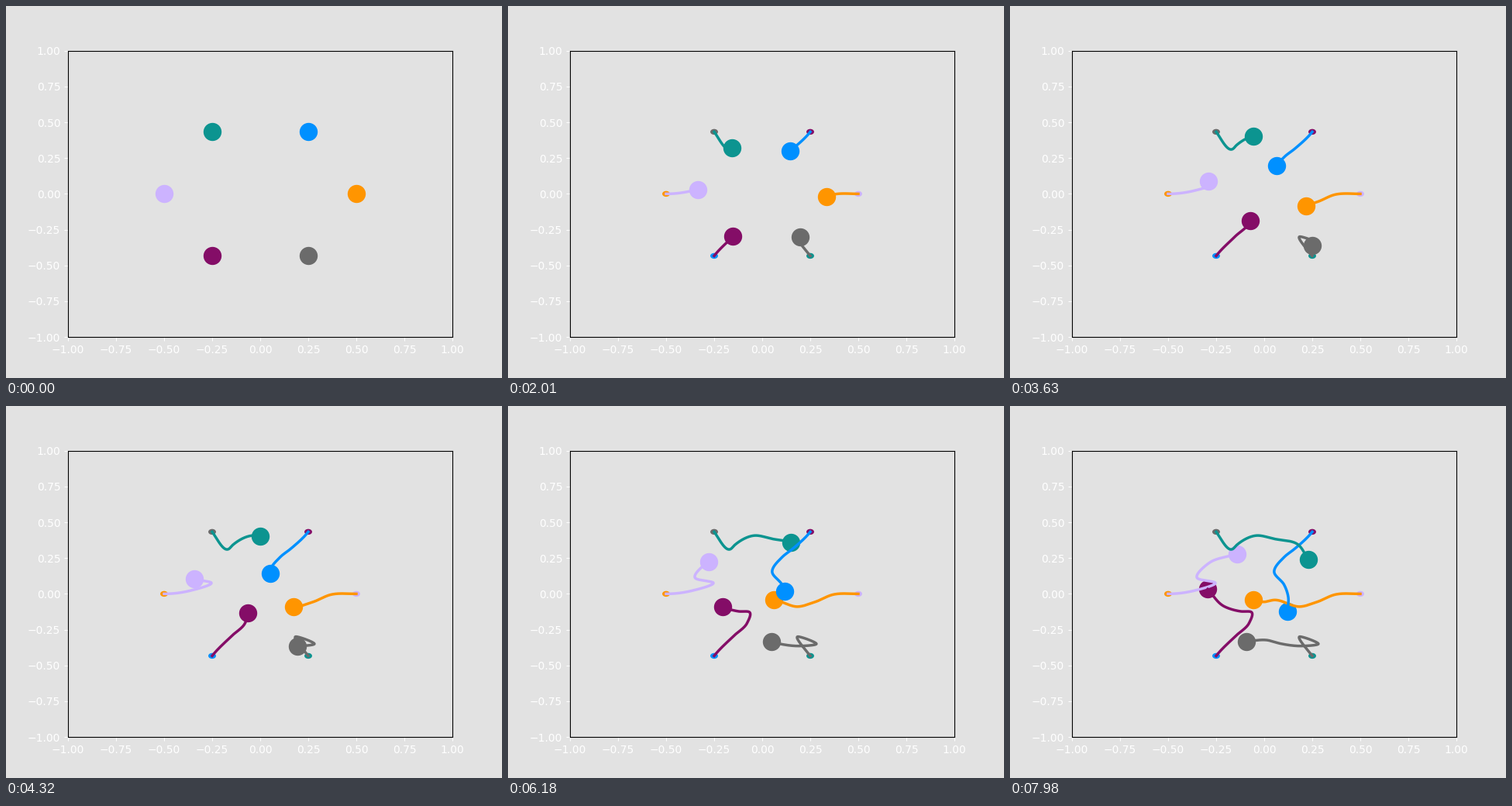
Animation of 640 by 480 pixels, one loop 8 s. Source, as a matplotlib script:

```python
import numpy as np
import matplotlib.pyplot as plt
from matplotlib.animation import FuncAnimation
from matplotlib.patches import Circle

W, H, DPI = 640, 480, 100
LOOP, INTERVAL, STEP = 8000, 20, 30
CRUISE = 1 / 12000      # axes units per ms
CRUISE_END = 3600
BG = "#e2e2e2"

# Agents counter-clockwise from the right: colour, and the turning points
# of its way in hundredths of an axes unit.
AGENTS = [
    ("#ff9500", [(36.9, -.5), (27.8, -5.5), (18.8, -8.9), (5, -4.3),
                 (-.2, -5.6), (-5.6, -4)]),
    ("#0090ff", [(15.9, 31.5), (10.5, 25.8), (5.2, 15.2), (10.3, 6.5),
                 (12.5, -2.1), (12.1, -12.4)]),
    ("#0c9490", [(-16.3, 31.4), (-14.3, 34.1), (-4.2, 40.7), (5.6, 38.3),
                 (16.7, 35.2), (23, 24.1)]),
    ("#ccb3ff", [(-36.5, 2.2), (-25.4, 7.7), (-34.9, 11.1), (-28.2, 22),
                 (-14.3, 27.7)]),
    ("#840d67", [(-15.1, -29.7), (-7.9, -20.5), (-6.7, -12.7),
                 (-12.3, -12.2), (-20.6, -8.9), (-29.4, 3.3)]),
    ("#6b6b6b", [(18.4, -29.9), (28.2, -35), (18.8, -36.4), (8.7, -34.8),
                 (1.4, -32.3), (-9.3, -33.2)]),
]


def lengths(pts):
    """Distance covered on reaching each point."""
    return np.r_[0, np.cumsum(np.hypot(*np.diff(pts, axis=0).T))]


def smooth_curve(pts, samples=60):
    """Hermite curve through the points, setting off towards the centre."""
    s = lengths(pts)
    slope = np.gradient(pts, s, axis=0)
    slope[0] = -pts[0] / np.hypot(*pts[0])
    u = np.linspace(0, 1, samples)[:, None]
    parts = []
    for k, h in enumerate(np.diff(s)):
        parts.append((1 + 2 * u) * (1 - u) ** 2 * pts[k]
                     + u * (1 - u) ** 2 * h * slope[k]
                     + u ** 2 * (3 - 2 * u) * pts[k + 1]
                     + u ** 2 * (u - 1) * h * slope[k + 1])
    return np.vstack(parts)


def travel(start, turns):
    """Positions per step: cruise first, then spread the rest evenly."""
    curve = smooth_curve(np.vstack([start, np.array(turns) / 100]))
    s = lengths(curve)
    t = np.arange(0, LOOP, STEP)
    dist = np.interp(t, [0, CRUISE_END, t[-1]], [0, CRUISE * CRUISE_END, s[-1]])
    return np.column_stack([np.interp(dist, s, c) for c in curve.T])


fig, ax = plt.subplots(figsize=(W / DPI, H / DPI), dpi=DPI, facecolor=BG)
ax.set_facecolor(BG)
ax.set_xlim(-1, 1)
ax.set_ylim(-1, 1)
ax.tick_params(colors="white")

angles = np.arange(6) * np.pi / 3
starts = 0.5 * np.column_stack([np.cos(angles), np.sin(angles)])
colors = [color for color, _ in AGENTS]
paths = [travel(s, turns) for s, (_, turns) in zip(starts, AGENTS)]

# each agent's goal is the start of the one opposite
for i, color in enumerate(colors):
    ax.add_patch(Circle(starts[(i + 3) % 6], 0.02, facecolor=color, lw=0))

bodies = [ax.scatter(*s, s=250, color=c) for s, c in zip(starts, colors)]
trails = [ax.plot([], [], color=c, lw=2.5)[0] for c in colors]


def update(frame):
    step = (frame * INTERVAL + INTERVAL // 2) // STEP
    for path, body, trail in zip(paths, bodies, trails):
        body.set_offsets(path[step])
        done = path[:step + 1] if step else path[:0]
        trail.set_data(done[:, 0], done[:, 1])
    return bodies + trails


anim = FuncAnimation(fig, update, frames=LOOP // INTERVAL, interval=INTERVAL,
                     init_func=lambda: update(0), repeat=True, repeat_delay=0)
plt.show()
```
